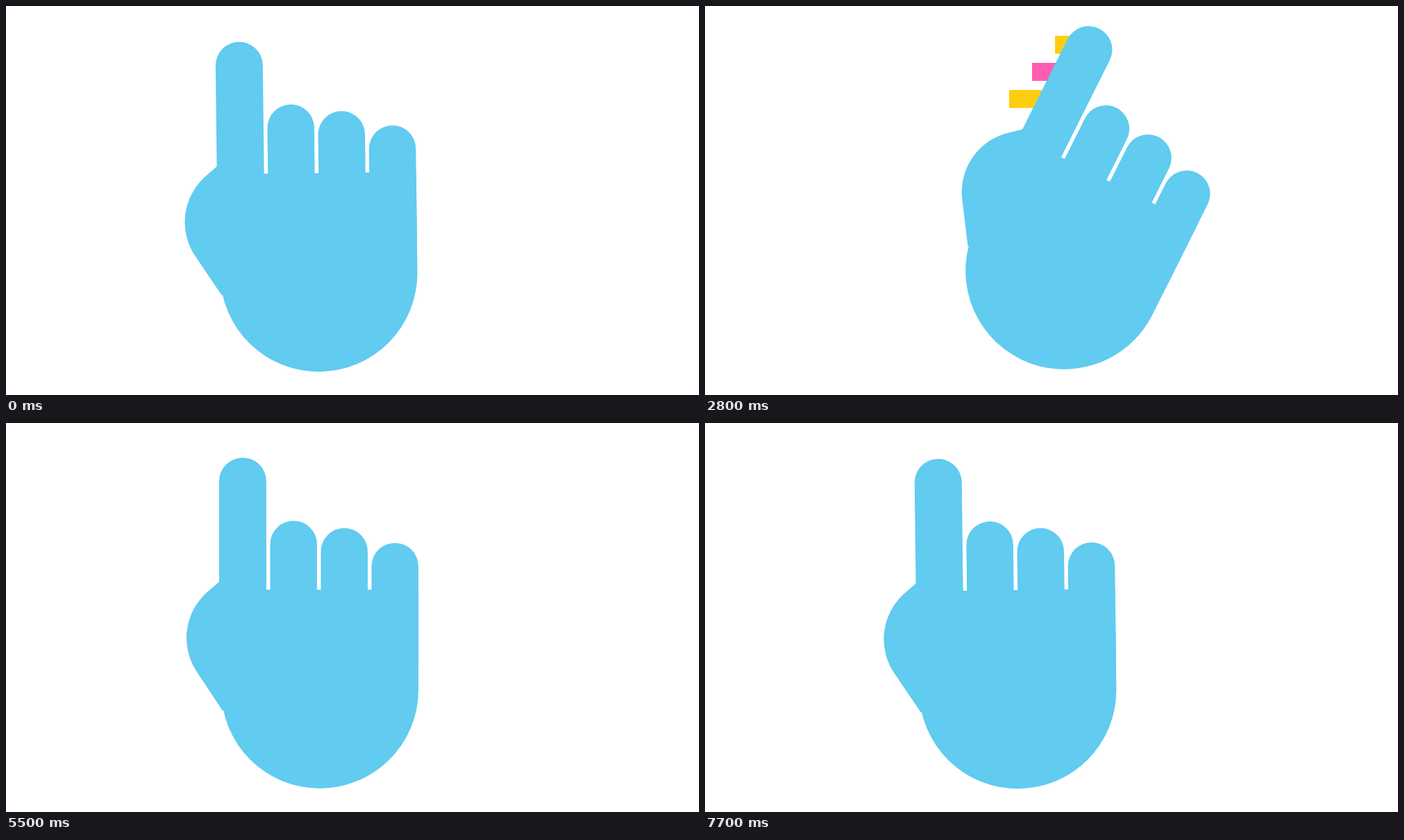
An HTML page that plays this animation: 998x561 px, repeating every 8000 ms.

```html
<!DOCTYPE html>
<html lang="en">
<head>
<meta charset="utf-8">
<title>Swiping hand</title>
<style>
  html, body { margin: 0; width: 100%; height: 100%; overflow: hidden; background: #fff; }
  svg { display: block; width: 100%; height: 100%; }
</style>
</head>
<body>
<svg viewBox="0 0 998 561">
  <g id="bars"></g>
  <g id="hand" fill="#61cbf0">
    <rect x="307" y="50" width="68" height="260" rx="34"/>
    <rect x="380.5" y="141" width="67.5" height="170" rx="33.75"/>
    <rect x="453.5" y="151.5" width="67.5" height="160" rx="33.75"/>
    <rect x="526.5" y="173" width="67.5" height="200" rx="33.75"/>
    <path d="M340 240.5H594V385A142 142 0 0 1 310 385Z"/>
    <path d="M307.5 228.8L290.5 243.3A88 88 0 0 0 275 359L312 415L450 385L400 241H340Z"/>
  </g>
</svg>
<script>
  const CYCLE = 2000, STEP = 50;
  const REST = -0.68, SWIPED = 26.55;
  const PIVOT = "491 521.6";
  const BAR_LENGTH = 230, BAR_HEIGHT = 26;
  const BARS = [
    { x: 325, y: 43, color: "#ffcd10" },
    { x: 292, y: 82, color: "#ff5db1" },
    { x: 259, y: 121, color: "#ffcd10" }
  ];

  const hand = document.getElementById("hand");
  const group = document.getElementById("bars");
  const rects = BARS.map(bar => {
    const rect = document.createElementNS("http://www.w3.org/2000/svg", "rect");
    rect.setAttribute("y", bar.y);
    rect.setAttribute("height", BAR_HEIGHT);
    rect.setAttribute("fill", bar.color);
    return group.appendChild(rect);
  });

  // Quintic ease in and out between two moments
  function ease(time, start, duration) {
    const t = Math.min(1, Math.max(0, (time - start) / duration));
    return t < 0.5 ? 16 * t ** 5 : 1 - 16 * (1 - t) ** 5;
  }

  function draw(time) {
    const swipe = ease(time, 0, 750);
    const back = ease(time, 955, 750);
    const angle = REST + (SWIPED - REST) * (swipe - back);
    hand.setAttribute("transform", `rotate(${angle} ${PIVOT})`);

    // Each bar grows after the finger, then its tail catches up
    const tail = ease(time, 455, 600);
    rects.forEach((rect, i) => {
      rect.setAttribute("x", BARS[i].x + BAR_LENGTH * tail);
      rect.setAttribute("width", Math.max(0, BAR_LENGTH * (swipe - tail)));
    });
  }

  const origin = performance.now();
  function tick() {
    const time = (performance.now() - origin) % CYCLE;
    draw(Math.floor(time / STEP) * STEP);
    requestAnimationFrame(tick);
  }
  tick();
</script>
</body>
</html>
```
